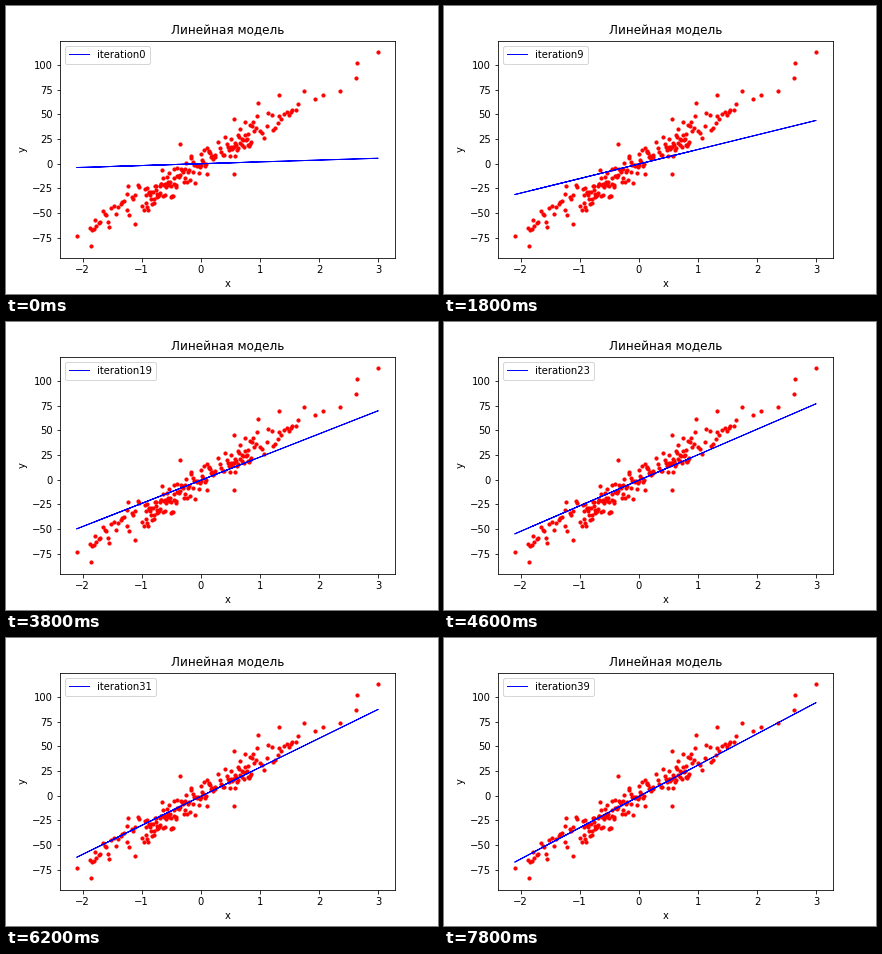
A matplotlib script that plays this animation: 432x288 px, repeating every 8000 ms.

```python
import numpy as np
import matplotlib.pyplot as plt
from matplotlib.animation import FuncAnimation

FRAMES, INTERVAL = 40, 200
SLOPE, BIAS, DECAY = 36.2, -0.9, 0.949

# Extreme points that shape the outline of the cloud
OUTLIERS = [
    (-2.10, -73), (-1.86, -84), (-1.12, -61), (-1.24, -23), (-0.35, 20),
    (0.56, -10), (0.57, 45), (0.96, 62), (1.33, 70), (1.75, 73.5),
    (1.94, 66), (2.06, 70), (2.36, 74), (2.63, 87), (2.64, 102), (3.00, 113),
]


def make_cloud(n=182, seed=7):
    """Points along a line, with x spread by a rough cumulative share."""
    rng = np.random.default_rng(seed)
    share = (np.arange(n) + rng.random(n)) / n
    x = np.interp(share, [0, 0.07, 0.16, 0.43, 0.65, 0.70, 0.89, 1],
                  [-1.9, -1.5, -0.95, -0.4, 0.2, 0.45, 0.9, 1.65])
    y = 34.5 * x + np.clip(rng.normal(0, 8, n), -16, 16)
    cloud = np.vstack([OUTLIERS, np.column_stack([x, y])])
    rng.shuffle(cloud)
    return cloud.T


xs, ys = make_cloud()

fig, ax = plt.subplots(figsize=(6, 4), dpi=72)
fig.subplots_adjust(left=0.125, right=0.9, bottom=0.125, top=0.88)
ax.scatter(xs, ys, s=10, color="red")
line, = ax.plot(xs, 0 * xs, color="blue", lw=1)
ax.set(xlim=(-2.3825, 3.2825), ylim=(-95.7, 124.9), xlabel="x", ylabel="y",
       title="Линейная модель",
       xticks=range(-2, 4), yticks=range(-75, 101, 25))


def update(i):
    learned = 1 - DECAY ** (i + 1)
    line.set_ydata(learned * (SLOPE * xs + BIAS))
    line.set_label(f"iteration{i}")
    return line, ax.legend(loc="upper left")


anim = FuncAnimation(fig, update, frames=FRAMES, interval=INTERVAL,
                     init_func=lambda: update(0), repeat=True, repeat_delay=0)
plt.show()
```
